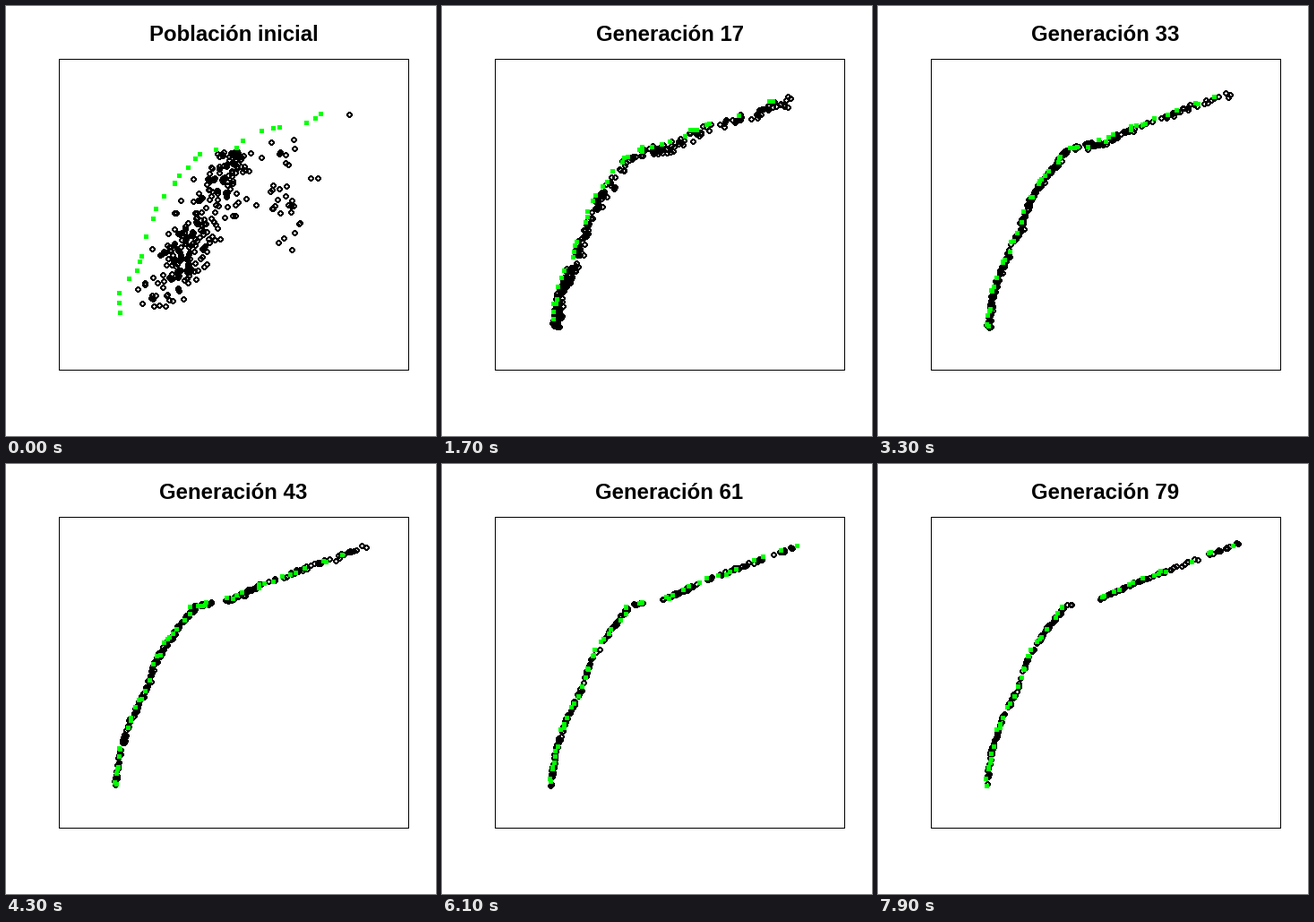
Write a matplotlib script that moves like this. It is 480 px wide and 480 px high and loops after 8000 ms.

```python
import numpy as np
import matplotlib.pyplot as plt
from matplotlib.animation import FuncAnimation
from matplotlib.patches import PathPatch, Rectangle
from matplotlib.path import Path

SIZE, FRAMES, STEP = 480, 80, 100
rng = np.random.default_rng(12)

# Matching key points of the Pareto front, first and last generation
START = np.array([(125, 347), (128, 310), (147, 292), (158, 242),
                  (174, 212), (192, 190), (215, 164), (255, 156),
                  (287, 138), (330, 130), (360, 116)], float)
END = np.array([(119, 358), (125, 321), (136, 283), (154, 250),
                (166, 214), (186, 184), (208, 156), (249, 148),
                (285, 131), (334, 112), (404, 86)], float)
INWARD = np.array([0.75, 0.65])


def front_point(s, gen):
    """Point on the front at s in 0..1; the front settles over time."""
    line = END + (START - END) * np.exp(-gen / 17)
    return np.array([np.interp(s * 10, range(11), axis) for axis in line.T])


def initial_cloud():
    edge = front_point(np.linspace(0, 1, 400), 0)
    blobs = [  # count, centre, spread, slant
        (190, 204, 265, 20, 38, -0.5),
        (65, 246, 182, 14, 18, -0.3),
        (34, 314, 210, 18, 36, 0)]
    dots = [(383, 121)]
    for count, cx, cy, sx, sy, slant in blobs:
        goal = len(dots) + count
        while len(dots) < goal:
            u, v = rng.normal(size=2)
            x, y = cx + sx * u + slant * sy * v, cy + sy * v
            below = np.interp(x, *edge) + 3 < y < 346
            if max(abs(u), abs(v)) < 2 and x > 127 and below:
                dots.append((x, y))
    # Dots far from the front die out first
    for x, y in dots:
        dist = np.hypot(edge[0] - x, edge[1] - y).min()
        yield x, y, int(np.clip(1 + 130 / dist + rng.uniform(-1, 1), 1, 18))


def dominated_dots():
    """Rows of x, y, birth, death; each dead dot is replaced near the front."""
    dots = []
    for x, y, death in initial_cloud():
        dots.append((x, y, 0, death))
        retire = FRAMES if rng.random() < 0.7 else rng.integers(0, 50)
        while death < retire:
            birth = death
            s = rng.random() ** (1 + 1.2 * np.exp(-birth / 15))
            depth = rng.uniform(0.2, 1) * (3 + 20 * np.exp(-birth / 14))
            x, y = front_point(s, birth) + INWARD * depth
            death = birth + rng.integers(3, 7 + birth // 2)
            dots.append((x, y, birth, death))
    return np.array(dots)


def front_dots(first=26, total=48):
    dots = []
    for slot in range(total):
        birth = 0 if slot < first else rng.integers(4, 33)
        while birth < FRAMES:
            s = np.clip(slot * 0.618 % 1 + rng.normal(0, 0.012), 0, 1)
            x, y = front_point(s, birth) + INWARD * rng.uniform(-1, 3)
            death = birth + rng.integers(4, 18 + birth)
            dots.append((x, y, birth, death))
            birth = death
    return np.array(dots)


def circles(dots, gen, radius):
    """One path with all dots alive at gen, centred on whole pixels."""
    x, y, birth, death = dots.T
    gap = np.clip((gen - 38) * 0.44, 0, 13.5)  # the band breaks apart late
    alive = (birth <= gen) & (gen < death) & (abs(x - 234.5) >= gap)
    centers = np.round(dots[alive, :2]) + 0.5
    return Path.make_compound_path(*[Path.circle(c, radius) for c in centers])


black, green = dominated_dots(), front_dots()

fig = plt.figure(figsize=(SIZE / 72, SIZE / 72), dpi=72, facecolor="white")
ax = fig.add_axes([0, 0, 1, 1])
ax.set(xlim=(0, SIZE), ylim=(SIZE, 0))
ax.axis("off")
crisp = dict(antialiased=False, snap=False)
ax.add_patch(Rectangle((59.5, 59.5), 390, 347, fill=False, ec="black",
                       lw=1, **crisp))
title = ax.text(254, 39, "", ha="center", va="baseline", fontsize=24,
                family="Liberation Sans", weight="bold")
empty = Path(np.zeros((1, 2)))
rings = ax.add_patch(PathPatch(empty, fc="none", ec="black", lw=1, **crisp))
front = ax.add_patch(PathPatch(empty, fc="#00ff00", lw=0, **crisp))


def update(gen):
    title.set_text(f"Generación {gen}" if gen else "Población inicial")
    rings.set_path(circles(black, gen, 2.2))
    front.set_path(circles(green, gen, 2.5))
    return title, rings, front


anim = FuncAnimation(fig, update, frames=FRAMES, interval=STEP,
                     repeat=True, repeat_delay=0)
plt.show()
```
